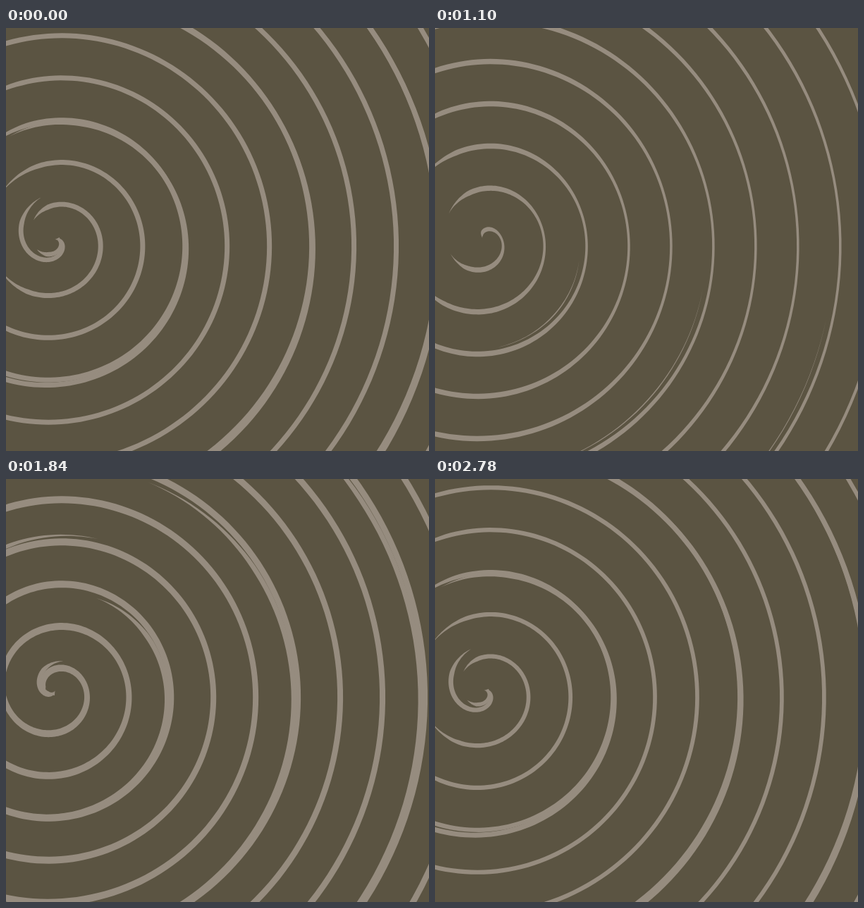
Animation, 600 px wide and 600 px high, one loop 2800 ms. Source, as an HTML page with a canvas:

```html
<!DOCTYPE html>
<html>
<head>
<meta charset="utf-8">
<style>
  html, body { margin: 0; width: 100%; height: 100%; overflow: hidden; background: #5b5442; }
  canvas { display: block; }
</style>
</head>
<body>
<canvas width="600" height="600"></canvas>
<script>
const ctx = document.querySelector('canvas').getContext('2d');
const CX = 69.5, CY = 300, MAX_R = 640, LOOP = 2800, STEPS = 60;

// Line weights and left-hand gap over the 60 steps of a loop
const KEYS     = [0, 16, 23, 34, 40, 52, 59, 60];
const SIDE     = [7, 8, 3.5, 5, 8, 5.5, 5.7, 7];
const VERTICAL = [7, 7.5, 7.5, 6.5, 10, 6.2, 6.2, 7];
const GAP      = [35, 34, 30, 43, -20, 43, 36, 35];

const clamp = v => Math.max(0, Math.min(1, v));

function keyed(values, n) {
  let i = 0;
  while (n > KEYS[i + 1]) i++;
  const k = (n - KEYS[i]) / (KEYS[i + 1] - KEYS[i]);
  return values[i] + (values[i + 1] - values[i]) * k;
}

// Steps last 20, 100 and 20 ms in turn
function stepAt(ms) {
  const t = ms % LOOP, part = t % 140;
  return 3 * Math.floor(t / 140) + (part < 20 ? 0 : part < 120 ? 1 : 2);
}

// Fills a band of varying width; shape(angle) gives [inner radius, width]
function ribbon(from, to, shape) {
  const outer = [], inner = [];
  for (let a = from; a <= to; a += 2) {
    const [r, w] = shape(a);
    const c = Math.cos(a * Math.PI / 180), s = Math.sin(a * Math.PI / 180);
    inner.push([CX + r * c, CY + r * s]);
    outer.push([CX + (r + w) * c, CY + (r + w) * s]);
  }
  ctx.beginPath();
  for (const [x, y] of outer.concat(inner.reverse())) ctx.lineTo(x, y);
  ctx.fill();
}

function mainSpiral(n) {
  const side = keyed(SIDE, n), vertical = keyed(VERTICAL, n), gap = keyed(GAP, n);
  ribbon(-6 * n, 6 * (MAX_R - n), a => {
    const r = a / 6 + n + 0.5;
    const turn = ((a % 360) + 360) % 360;
    const full = side + (vertical - side) * Math.sin(a * Math.PI / 180) ** 2;
    const taper = clamp((Math.abs(turn - 187) - gap) / 35);
    return [r + full * (1 - taper) / 2, full * taper * clamp(r / 4)];
  });
}

// Steeper arcs that cross every third turn of the main spiral
function crossingArcs(n) {
  const PITCH = 0.227, OFFSET = 104;
  const age = (n + 40) % STEPS;
  const start = 150 + 0.06 * age * age;
  const end = Math.min(150 + 25 * age, 440 + 4.3 * age);
  const breakStart = 431, breakEnd = 420 + 7.8 * (age - 40);
  const strength = 7 * clamp(age / 12);
  for (let base = -180; base < MAX_R; base += 180) {
    const first = Math.max(start, -(base + OFFSET) / PITCH);
    ribbon(first - 6 * n, end - 6 * n, a => {
      const phi = a + 6 * n;
      let taper = clamp((phi - start) / 35) * clamp((end - phi) / 45);
      if (breakEnd > breakStart) {
        taper *= clamp((phi < breakStart ? breakStart - phi : phi - breakEnd) / 40);
      }
      const w = strength * taper;
      return [Math.max(0, PITCH * phi + OFFSET + base - w / 2), w];
    });
  }
}

function draw(now) {
  const n = stepAt(now);
  ctx.fillStyle = '#5b5442';
  ctx.fillRect(0, 0, 600, 600);
  ctx.fillStyle = '#968c7f';
  mainSpiral(n);
  crossingArcs(n);
  requestAnimationFrame(() => draw(performance.now() - began));
}

const began = performance.now();
draw(0);
</script>
</body>
</html>
```
